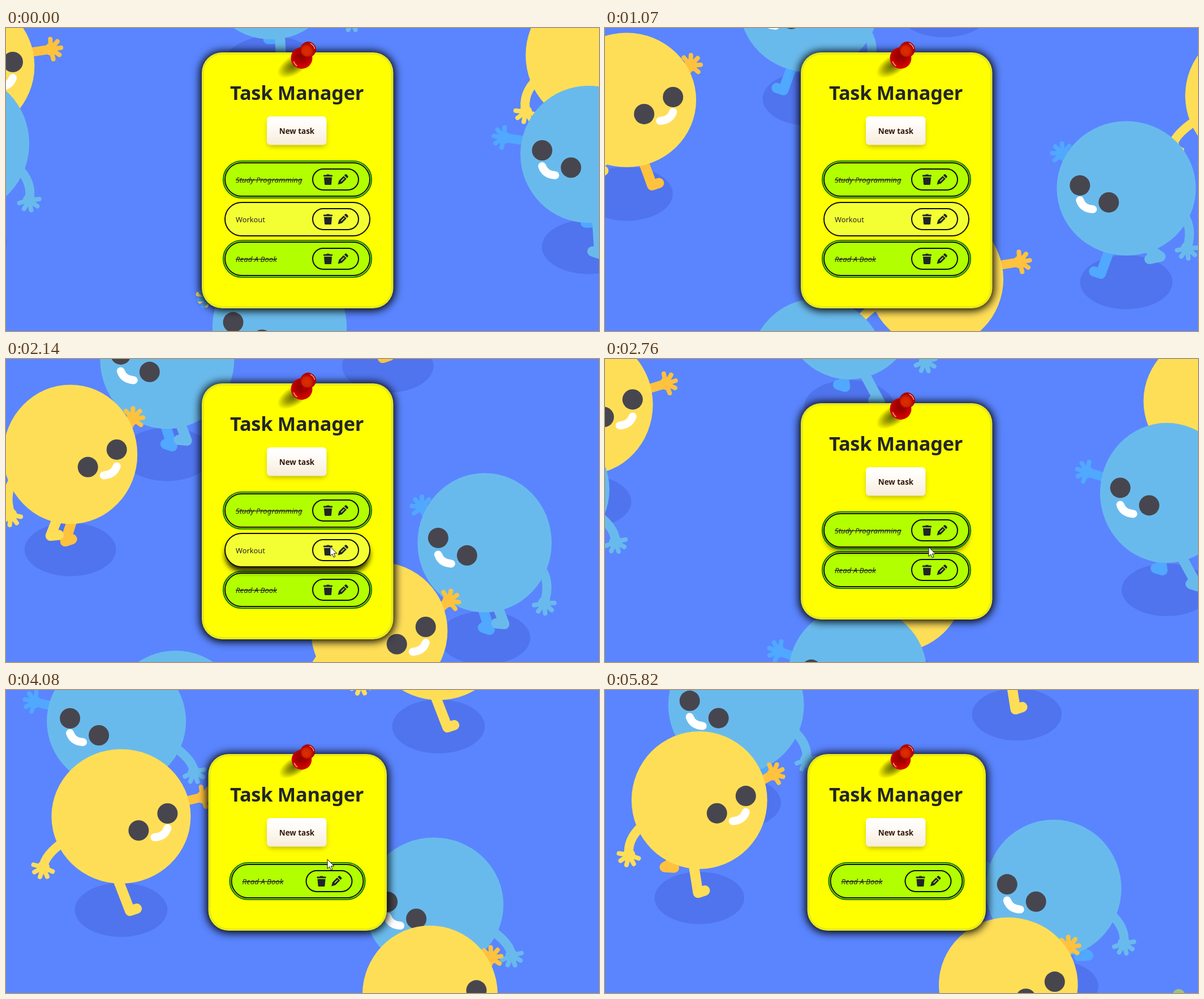
These frames come from a looping animation (1048x535 px, 5.87 s). An HTML page:

```html
<!DOCTYPE html>
<html lang="en">
<head>
<meta charset="utf-8">
<title>Task Manager</title>
<style>
html, body { margin: 0; width: 100%; height: 100%; overflow: hidden; background: #5a85ff; }
svg { display: block; width: 1048px; height: 535px; }
text { font-family: "Noto Sans", "Open Sans", sans-serif; }
.title { font-size: 34.4px; font-weight: 700; letter-spacing: -.3px; fill: #212529; text-anchor: middle; }
.button { font-size: 13.4px; font-weight: 700; fill: #34180a; text-anchor: middle; }
.task { font-size: 12.8px; fill: #212529; }
.done { font-size: 13.2px; font-style: italic; text-decoration: line-through; }
.limb { fill: none; stroke-linecap: round; stroke-linejoin: round; }
</style>
</head>
<body>
<svg viewBox="0 0 1048 535">
  <defs>
    <linearGradient id="cream" x2="0" y2="1"><stop stop-color="#fff"/><stop offset=".25" stop-color="#fffdfa"/><stop offset="1" stop-color="#f7ecda"/></linearGradient>
    <radialGradient id="knob" cx=".4" cy=".6"><stop stop-color="#d83200"/><stop offset=".6" stop-color="#d42400"/><stop offset="1" stop-color="#b00000"/></radialGradient>
    <radialGradient id="base" cx=".5" cy=".38"><stop stop-color="#8c0000"/><stop offset=".55" stop-color="#a80000"/><stop offset="1" stop-color="#d00000"/></radialGradient>
    <radialGradient id="shade" cx=".62"><stop stop-color="#000" stop-opacity=".6"/><stop offset=".5" stop-color="#000" stop-opacity=".36"/><stop offset="1" stop-color="#000" stop-opacity="0"/></radialGradient>
    <filter id="blur" x="-30%" y="-30%" width="160%" height="160%"><feGaussianBlur stdDeviation="7.5"/></filter>
    <filter id="soft" x="-30%" y="-60%" width="160%" height="220%"><feGaussianBlur stdDeviation="5"/></filter>
  </defs>
  <rect width="1048" height="535" fill="#5a85ff"/>
  <g id="crowd"></g>
  <g id="card"></g>
  <circle id="dot" cx="1014" cy="539" r="11" fill="#a3bf80"/>
  <path id="cursor" d="M0 0V16.5L3.8 13L6.3 18.8L9 17.6L6.5 12H11.8Z" fill="#fff" stroke="#111" stroke-width="1"/>
</svg>
<script>
const LOOP = 5870, STEP = 51.05;
const SLOPE = 0.577, AHEAD = 546, ASIDE = 561;
const DELETE_WORKOUT = 2600, DELETE_STUDY = 3500;

// time, distance walked
const WALK = [[0, -70], [1070, 583], [2140, 1203], [2760, 1607], [4080, 2385], [4900, 2879], [5820, 3443]];
// time, x, y of the pointer
const POINTER = [[1600, 650, 545], [2000, 573, 331], [2760, 572, 332], [3150, 568, 299], [4250, 568, 299], [4650, 1060, 560]];
// stride phase, x, y of the near toe around the body centre
const STRIDE = 324;
const TOE = [[-13, -60, 151], [5, -76, 135], [41, -38, 124], [113, -21, 142], [149, 1, 158], [204, 28, 163],
  [252, -5, 172], [286, -38, 163], [311, -60, 151], [329, -76, 135]];

const SKINS = {
  yellow: { near: '#ffde57', far: '#ffc23f' },
  blue: { near: '#69baec', far: '#50a8ff' }
};

const $ = id => document.getElementById(id);
const mod = (a, n) => ((a % n) + n) % n;
const wave = (p, peak, period) => Math.cos(2 * Math.PI * (p - peak) / period);
const clamp = v => Math.max(0, Math.min(1, v));
const num = v => v.toFixed(1);

function track(keys, t) {
  if (t <= keys[0][0]) return keys[0].slice(1);
  for (let i = 1; i < keys.length; i++) {
    const a = keys[i - 1], b = keys[i];
    if (t <= b[0]) {
      const k = (t - a[0]) / (b[0] - a[0]);
      return a.slice(1).map((v, j) => v + (b[j + 1] - v) * k);
    }
  }
  return keys[keys.length - 1].slice(1);
}

const limb = (d, color, width) =>
  `<path class="limb" d="${d}" stroke="${color}" stroke-width="${width}"/>`;

function hand(x, y, angle, color) {
  let d = '';
  for (const spread of [-85, -42, 0, 42, 85]) {
    const a = (angle + spread) * Math.PI / 180;
    d += `M${num(x)} ${num(y)}l${num(18 * Math.cos(a))} ${num(18 * Math.sin(a))}`;
  }
  return `<circle cx="${num(x)}" cy="${num(y)}" r="11" fill="${color}"/>` + limb(d, color, 8);
}

function leg(p, dx, dy, color) {
  const [tx, ty] = track(TOE, mod(p, STRIDE));
  const lift = clamp((150 - ty) / 30);
  const x = tx + dx, y = ty + dy;
  const ax = x - 12 - 9 * lift, ay = y + 4 - 10 * lift;
  return limb(`M${dx - 14} ${dy + 90}L${num(ax)} ${num(ay)}L${num(x)} ${num(y)}`, color, 18);
}

function walker(w) {
  const { p, skin } = w;
  const { near, far } = SKINS[skin];
  const swing = wave(p, 242, STRIDE), stretch = wave(p, 132, 162);
  const fx = 128 + 22 * swing, fy = -48 + 19 * swing;
  const nx = -122 - 21 * swing, ny = 98 - 11 * swing;
  return `<g transform="translate(${num(w.x)} ${num(w.y - w.h)}) scale(${skin === 'blue' ? -1 : 1} 1)">` +
    leg(p + STRIDE / 2, 31, -16, far) +
    limb(`M85 -20L${num(fx)} ${num(fy)}`, far, 16) +
    hand(fx, fy, -30 + 22 * swing, far) +
    leg(p, 0, 0, near) +
    `<ellipse rx="${num(120.5 - 2.7 * stretch)}" ry="${num(121 + 2.6 * stretch)}" fill="${near}"/>` +
    limb(`M-98 42Q${num(nx * .55 - 60)} 68 ${num(nx)} ${num(ny)}`, near, 16) +
    hand(nx, ny, 103 + 9 * swing, near) +
    `<g fill="#47464f"><circle cx="82" cy="${num(-7 - 2 * stretch)}" r="18"/>` +
    `<circle cx="31" cy="${num(23.5 - 1.5 * stretch)}" r="18"/></g>` +
    limb('M59 37Q77 36 82 21', '#fff', 14) + '</g>';
}

function crowd(t) {
  const x0 = mod(track(WALK, t)[0] + 200, AHEAD) - 200;
  const y0 = 336 + SLOPE * (x0 - 113);
  const all = [];
  for (let n = -2; n <= 3; n++) for (let m = -3; m <= 3; m++) {
    const p = x0 + n * AHEAD, bounce = wave(p, 152, 162);
    const add = (skin, x, y) => {
      if (x > -190 && x < 1240 && y > -60 && y < 870)
        all.push({ skin, x, y, p, h: 167.5 + 6 * bounce, r: 81 - 2.2 * bounce });
    };
    const ahead = n * AHEAD * SLOPE, aside = m * 324;
    add('yellow', p + m * ASIDE, y0 + ahead - aside);
    add('blue', 959.5 - p + m * ASIDE, y0 + 156 + ahead + aside);
  }
  all.sort((a, b) => a.y - b.y);
  return all.map(w => `<ellipse cx="${num(w.x)}" cy="${num(w.y)}" rx="${num(w.r)}" ry="${num(w.r * .583)}" fill="#5074ee"/>`).join('') +
    all.map(walker).join('');
}

const pill = (x, y, w, h, attrs) =>
  `<rect x="${x}" y="${y}" width="${w}" height="${h}" rx="${h / 2}" ${attrs}/>`;

const TRASH = '<path d="M-8 -7.5Q-8 -8.5 -7 -8.5H-3L-2 -9.5H2L3 -8.5H7Q8 -8.5 8 -7.5V-5.8H-8ZM-7 -4.3H7L6 7.5Q5.8 9 4.5 9H-4.5Q-5.8 9 -6 7.5Z"/>';
const PENCIL = '<g transform="rotate(45)"><path d="M-3.6 -9.5Q-3.6 -11.5 -1.6 -11.5H1.6Q3.6 -11.5 3.6 -9.5V-7.5H-3.6ZM-3.6 -6H3.6V5.5L0 12L-3.6 5.5Z"/>' +
  '<path d="M0 -4V4" stroke="#d3ff1a" stroke-width="1.4"/></g>';

function row(task, x, c, w) {
  const right = x + w;
  return (task.done ? pill(x - 3, c - 33, w + 6, 65, 'fill="none" stroke="#008000" stroke-width="2.2"') : '') +
    pill(x, c - 30, w, 59, `fill="${task.done ? '#b2ff00' : '#f4ff33'}" stroke="#0c0c0c" stroke-width="2"`) +
    `<text class="task ${task.done ? 'done' : ''}" x="${x + 19}" y="${c + 5}">${task.name}</text>` +
    pill(right - 101, c - 19, 81, 37, 'fill="none" stroke="#0c0c0c" stroke-width="2"') +
    `<g fill="#212529"><g transform="translate(${right - 74} ${c})">${TRASH}</g>` +
    `<g transform="translate(${right - 48} ${c})">${PENCIL}</g></g>`;
}

function pin(y, scale) {
  return `<g transform="translate(522.5 ${y + 10}) scale(${scale})">` +
    '<ellipse cx="-20" cy="17" rx="34" ry="17" transform="rotate(-32 -20 17)" fill="url(#shade)"/>' +
    '<circle r="19" fill="url(#base)"/><path d="M-4 -8L4 -20L20 -6L9 2Z" fill="#a80000"/>' +
    '<path d="M-14 6Q-12 12 -8 14" fill="none" stroke="#ff8a70" stroke-width="2"/>' +
    '<circle cx="11.5" cy="-15" r="13.5" fill="url(#knob)" stroke="#a30000"/>' +
    '<path d="M15 -26Q22 -23 23 -16" fill="none" stroke="#ffc9b0" stroke-width="1.2"/></g>';
}

const TASKS = [
  { name: 'Study Programming', done: true, from: DELETE_WORKOUT, until: DELETE_STUDY, fade: 330 },
  { name: 'Workout', from: 1950, until: DELETE_WORKOUT, fade: 150 },
  { name: 'Read A Book', done: true, until: Infinity }
];

function card(t) {
  const tasks = TASKS.filter(task => t < task.until);
  const narrow = tasks.length === 1 ? 11.5 : 0;
  const x = 346 + narrow, w = 338.5 - 2 * narrow;
  const h = 242 + 70 * tasks.length, y = 269 - h / 2;
  const rowX = 387 + narrow, rowW = 256 - 2 * narrow;
  let plain = '', raised = '';
  tasks.forEach((task, i) => {
    const c = y + 225 + 70 * i, glow = clamp((t - task.from) / task.fade) || 0;
    if (!glow) plain += row(task, rowX, c, rowW);
    else raised += pill(rowX, c - 23, rowW, 61, `fill="#000" opacity="${num(glow * .8)}" filter="url(#soft)"`) + row(task, rowX, c, rowW);
  });
  return `<rect x="${x - 3}" y="${y - 2}" width="${w + 6}" height="${h + 6}" rx="39" filter="url(#blur)"/>` +
    `<rect x="${x}" y="${y}" width="${w}" height="${h}" rx="36" fill="#e9e91c"/>` +
    `<rect x="${x + 4}" y="${y + 4}" width="${w - 8}" height="${h - 8}" rx="32" fill="#ff0"/>` +
    pin(y, w / 338.5) +
    `<text class="title" x="514" y="${y + 84}">Task Manager</text>` +
    `<rect x="463" y="${y + 119}" width="102" height="47" rx="6" fill="#3a2800" opacity=".35" filter="url(#soft)"/>` +
    `<rect x="461" y="${y + 113}" width="105.5" height="50.5" rx="6" fill="url(#cream)"/>` +
    `<text class="button" x="514" y="${y + 144}">New task</text>` + plain + raised;
}

let shown = -1;
function draw(now) {
  const step = Math.floor(mod(now, LOOP) / STEP + .15) % 115;
  if (step !== shown) {
    shown = step;
    const t = step * STEP;
    $('crowd').innerHTML = crowd(t);
    $('card').innerHTML = card(t);
    const [x, y] = track(POINTER, t);
    $('cursor').setAttribute('transform', `translate(${num(x)} ${num(y)})`);
    $('dot').style.display = t > 5780 ? '' : 'none';
  }
}

const start = performance.now();
function tick() {
  draw(performance.now() - start);
  requestAnimationFrame(tick);
}
tick();
</script>
</body>
</html>
```
